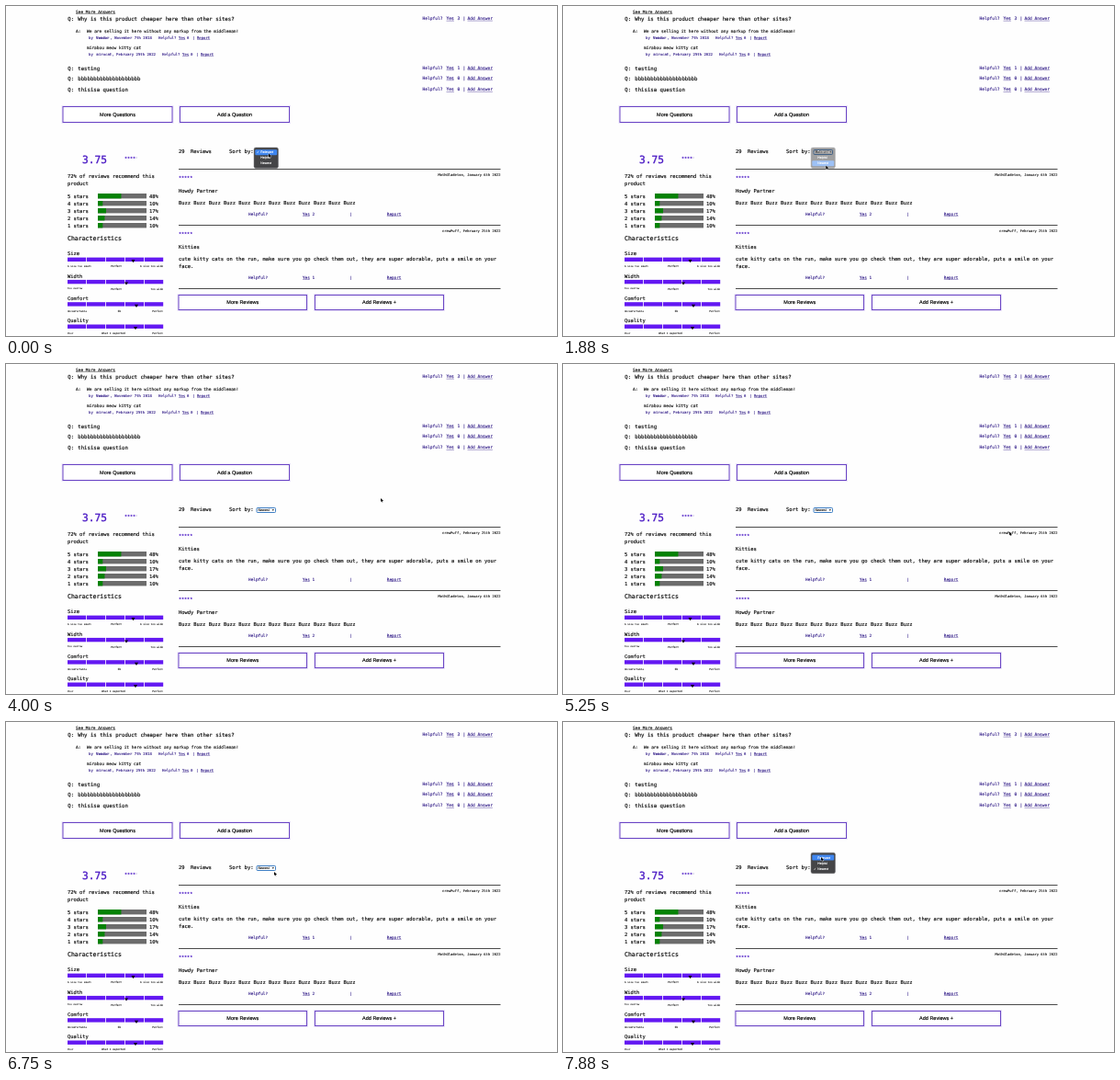
An HTML page for the animation above (8000 ms loop, 600x359 px).

```html
<!DOCTYPE html>
<html lang="en">
<head>
<meta charset="utf-8">
<title>Product reviews</title>
<style>
html, body { margin: 0; width: 100%; height: 100%; overflow: hidden; background: #fefefe; }
svg { display: block; }
text { font-family: "DejaVu Sans Mono", "Noto Sans Mono", monospace; white-space: pre; text-rendering: geometricPrecision; }
.sans { font-family: "Liberation Sans", Arial, sans-serif; }
.star { font-family: "DejaVu Sans", sans-serif; }
</style>
</head>
<body>
<svg id="stage" width="600" height="359" viewBox="0 0 600 359"></svg>
<script>
const INK = '#111', INDIGO = '#35208a', PURPLE = '#4a18c4', BAR = '#6318f2';
const stage = document.getElementById('stage');

// Text is placed by its visual middle; a thin outline gives it a medium weight.
const label = (x, y, s, size, fill, attrs = '') =>
  `<text x="${x}" y="${y + size * 0.33}" font-size="${size}" fill="${fill}" stroke="${fill}" stroke-width="${size * 0.03}" ${attrs}>${s}</text>`;
const mono = (x, y, s, pitch = 3.27, fill = INK, attrs) => label(x, y, s, pitch / 0.602, fill, attrs);
const rect = (x, y, w, h, fill, attrs = '') =>
  `<rect x="${x}" y="${y}" width="${w}" height="${h}" fill="${fill}" ${attrs}/>`;
const link = (x, y, s, pitch) => {
  const w = s.length * pitch;
  return mono(x, y, s, pitch, INDIGO) + rect(x, y + pitch * 0.78, w, 0.4, INDIGO);
};
const stars = (x, y, s, fill = PURPLE) => label(x, y, s, 3.4, fill, 'class="star"');
const END = 'text-anchor="end"', MID = 'text-anchor="middle"';

function button(x, y, w, h, s) {
  return rect(x, y, w, h, '#fff', 'stroke="#ece6fa" stroke-width="3"') +
    rect(x, y, w, h, '#fff', 'stroke="#6a45c4" stroke-width="1"') +
    label(x + w / 2, y + h / 2, s, 5.5, '#000', 'class="sans" ' + MID);
}

function answerMeta(x, y, count) {
  return mono(x, y, 'Helpful?', 2.45, INDIGO) + link(x + 22, y, 'Yes', 2.4) +
    mono(x + 31, y, count, 2.4, INDIGO) + mono(x + 37, y, '|', 2.4, INDIGO) +
    link(x + 42, y, 'Report', 2.37);
}

function questions() {
  let out = link(76, 6.3, 'See More Answers', 2.7).replaceAll(INDIGO, INK);
  [['Why is this product cheaper here than other sites?', 14.2, 3], ['testing', 68, 1],
   ['b'.repeat(20), 79, 0], ['thisisa question', 91.3, 0]].forEach(([s, y, n]) => {
    const r = y - 0.5;
    out += mono(67.3, y, 'Q:', 3.4) + mono(78.3, y, s, 3.41) +
      mono(453.5, r, 'Helpful?', 2.77, INDIGO) + link(479.5, r, 'Yes', 2.8) +
      mono(491.5, r, n, 2.77, INDIGO) + mono(497.5, r, '|', 2.77, INDIGO) +
      link(502.5, r, 'Add Answer', 2.74);
  });
  return out + mono(76, 27.3, 'A:', 2.72) +
    mono(88, 27.3, 'We are selling it here without any markup from the middleman!', 2.72) +
    mono(90, 34.5, 'by', 2.4, INDIGO) + mono(98, 34.5, 'Vendor', 2.4, INDIGO, 'font-weight="700"') +
    mono(113.5, 34.5, ', November 7th 2018', 2.4, INDIGO) + answerMeta(166, 34.5, 6) +
    mono(88, 45.3, 'mirabou meow kitty cat', 2.7) +
    mono(90, 52.7, 'by', 2.4, INDIGO) +
    mono(98.5, 52.7, 'mirocat, February 25th 2022', 2.4, INDIGO) + answerMeta(170, 52.7, 0) +
    button(62, 109.5, 119, 17, 'More Questions') + button(189.5, 109.5, 119, 17, 'Add a Question');
}

function ratings() {
  let out = mono(83, 167.7, '3.75', 6.75, PURPLE) + stars(129, 164.5, '★★★★') +
    stars(140.4, 164.5, '★', '#d8d2e8') +
    mono(67, 185, '72% of reviews recommend this') + mono(67, 193, 'product') +
    mono(67, 253, 'Characteristics', 3.93);
  [48, 10, 17, 14, 10].forEach((pct, i) => {
    const y = 207 + 8 * i;
    out += mono(67, y, `${5 - i} stars`) + rect(100, y - 3, 53, 5.4, '#6c6c6c') +
      rect(100, y - 3, 53 * pct / 100, 5.4, '#058205') + mono(156, y, pct + '%');
  });
  [['Size', 138.5, 'A size too small', 'Perfect', 'A size too wide'],
   ['Width', 131, 'Too narrow', 'Perfect', 'Too wide'],
   ['Comfort', 142, 'Uncomfortable', 'Ok', 'Perfect'],
   ['Quality', 141, 'Poor', 'What I expected', 'Perfect']].forEach(([name, mark, low, mid, high], i) => {
    const y = 275.8 + 24.3 * i;
    out += mono(67, y - 6.2, name);
    for (let k = 0; k < 5; k++) out += rect(67 + 21 * k, y - 2.2, 20.2, 4.4, BAR);
    const wide = mid.length > 9;
    out += `<path d="M${mark - 2} ${y + 0.3}h4l-2 3.2z"/>` +
      mono(67, y + 7.5, low, 1.63) + mono(wide ? 117 : i === 2 ? 123.5 : 120, y + 7.5, mid, 1.7, INK, MID) +
      mono(171, y + 7.5, high, 1.68, INK, END);
  });
  return out;
}

const rule = y => rect(188, y, 350.5, 1, '#4a4a4a');
const partner = { title: 'Howdy Partner', by: 'MothGladeton, January 6th 2022', yes: 2,
  lines: [Array(12).fill('Buzz').join(' ')] };
const kitties = { title: 'Kitties', by: 'crewPuff, February 25th 2022', yes: 1,
  lines: ['cute kitty cats on the run, make sure you go check them out, they are super adorable, puts a smile on your', 'face.'] };

function reviewList(list) {
  let y = 177, out = rule(y);
  for (const { title, by, yes, lines } of list) {
    out += stars(188, y + 8.5, '★★★★★') + mono(538.5, y + 6.9, by, 2.28, INK, END) +
      mono(188, y + 24, title);
    lines.forEach((s, i) => out += mono(188, y + 36.8 + 8 * i, s));
    y += 61 + 8 * (lines.length - 1);
    out += mono(264, y - 11.7, 'Helpful?', 2.65, INDIGO) + link(323, y - 11.7, 'Yes', 2.6) +
      mono(333.5, y - 11.7, yes, 2.6, INDIGO) + mono(374, y - 11.7, '|', 2.6, INDIGO) +
      link(414.8, y - 11.7, 'Report', 2.6) + rule(y);
  }
  return out;
}

const selectBox = value =>
  rect(273, 156.5, 20.5, 5, '#fff', 'rx="0.8" stroke="#3f7fc4" stroke-width="1"') +
  label(274.4, 159, value, 3.7, '#111', 'class="sans"') +
  '<path d="M289.6 158.2h2.4l-1.2 1.6z"/>';

function menu(top, checked, hover, opacity) {
  let out = `<g opacity="${opacity}">` +
    rect(270, top, 26.5, 22.5, '#454547', 'rx="2" stroke="#77777a" stroke-width="0.5"');
  ['Relevant', 'Helpful', 'Newest'].forEach((s, i) => {
    const y = top + 5.3 + 6 * i;
    if (i === hover) out += rect(271.3, y - 3, 23.9, 6, '#3f86f0', 'rx="1"');
    if (i === checked) out += label(273, y, '✓', 3.4, '#fff', 'class="star"');
    out += label(277.2, y, s, 3.5, '#fff', 'class="sans"');
  });
  return out + '</g>';
}

const path = [[0, 286, 160.5], [875, 286, 161.5], [1625, 286.3, 173.5], [2750, 286.3, 173.5],
  [4000, 408, 146], [4250, 408, 146], [5000, 544, 172], [5250, 486, 182.5], [6000, 486, 182.5],
  [6750, 292, 163], [7125, 284, 158.5], [7500, 284, 158.5], [7875, 281, 147]];

function pointer(t) {
  const i = path.findIndex(p => p[0] > t);
  if (i < 0) return path.at(-1).slice(1);
  const [t0, x0, y0] = path[i - 1], [t1, x1, y1] = path[i];
  const u = (t - t0) / (t1 - t0), e = u * u * (3 - 2 * u);
  return [x0 + (x1 - x0) * e, y0 + (y1 - y0) * e];
}

stage.innerHTML = questions() + ratings() +
  mono(188, 158.5, '29') + mono(201, 158.5, 'Reviews') + mono(243, 158.5, 'Sort by:', 3.33) +
  button(188, 314.5, 139.5, 16, 'More Reviews') + button(336.5, 314.5, 140, 16, 'Add Reviews +') +
  '<g id="reviews"></g><g id="sort"></g>' +
  '<path id="cursor" d="M0 0v4l1-.9.7 1.5.7-.3-.7-1.4h1.4z" stroke="#fff" stroke-width="0.5" paint-order="stroke"/>';
const [reviews, sort, cursor] = ['reviews', 'sort', 'cursor'].map(id => document.getElementById(id));

const STEP = 125, LOOP = 8000;
let shown = -1;
function draw(now) {
  const t = Math.floor(now % LOOP / STEP) * STEP;
  if (t !== shown) {
    shown = t;
    const [x, y] = pointer(t);
    const opened = t < 2000 ? 154 : t >= 7500 ? 142.2 : 0;
    const hover = Math.max(0, Math.min(2, Math.floor((y - opened - 2.3) / 6)));
    reviews.innerHTML = reviewList(t < 2125 ? [partner, kitties] : [kitties, partner]);
    sort.innerHTML = selectBox(t < 2000 ? 'Relevant' : 'Newest') +
      (opened ? menu(opened, t < 2000 ? 0 : 2, hover, t === 1875 ? 0.5 : 1) : '');
    cursor.setAttribute('transform', `translate(${x} ${y})`);
  }
  requestAnimationFrame(draw);
}
draw(0);
</script>
</body>
</html>
```
